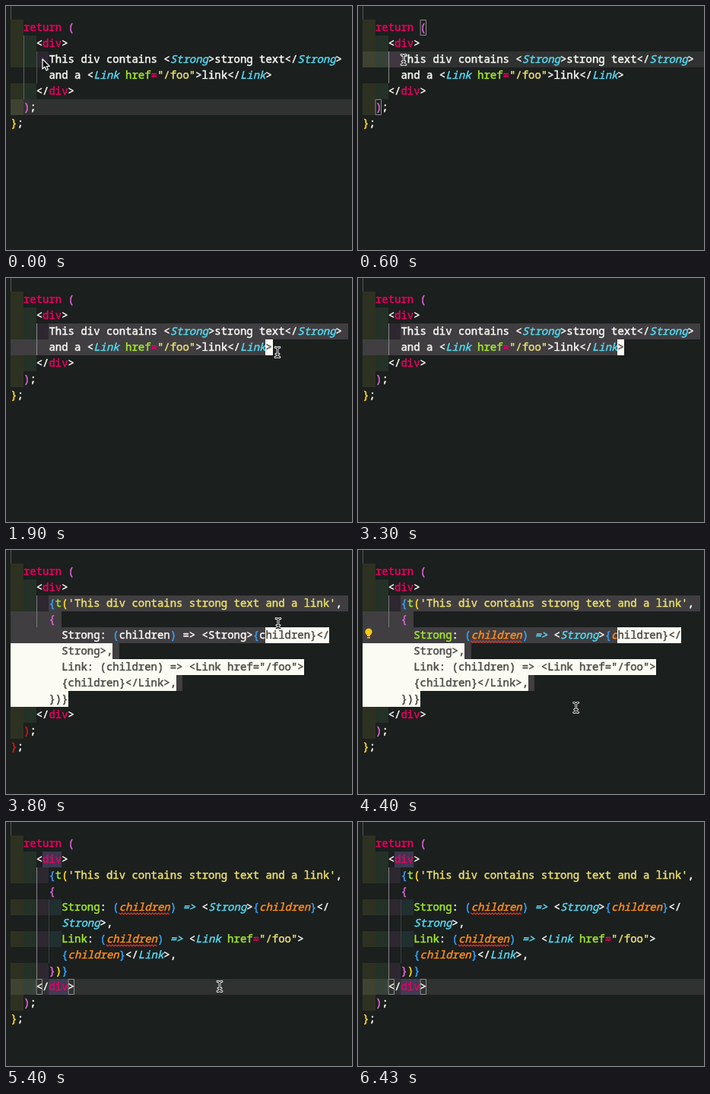
An HTML page with a canvas for the animation above (6.57 s loop, 455 px wide and 322 px high).

```html
<!DOCTYPE html>
<html lang="en">
<head>
<meta charset="utf-8">
<title>Editor refactoring</title>
<style>
html, body { margin: 0; width: 100%; height: 100%; overflow: hidden; background: #1b1f1e; }
canvas { display: block; width: 455px; height: 322px; }
</style>
</head>
<body>
<canvas id="stage" width="455" height="322"></canvas>
<script>
const ctx = document.getElementById('stage').getContext('2d');
const LOOP = 6570, STEP = 100, W = 455, H = 322;
const CW = 8.38, LH = 21, X0 = 6.2, Y0 = 18;
const FONT = '500 13.97px "Noto Sans Mono", "DejaVu Sans Mono", monospace';
const INK = { w: '#f8f8f4', p: '#e9005f', c: '#55d8ef', g: '#a0e52e', y: '#e9dd70',
  o: '#ff8c1a', b: '#35a0f5', m: '#da66cf', d: '#ffd71c', r: '#d01818' };
const BANDS = ['255,255,64', '127,255,127', '255,127,255', '79,236,236'];
const SELECTION = '#403e41', LIGHT = '#fbfbf3';

// Moments of the edit, in ms.
const CLICK = 600, DRAG = 1300, UNMATCH = 1700, PASTE = 3700, PARSED = 3900,
  BULB = 4100, LINT = 4300, RECLICK = 4500, WORDS = 4800, BULB_OFF = 5100;

const x = col => X0 + col * CW;
const y = row => Y0 + row * LH;

// Each line: indent, number of indent bands, then runs led by a colour key.
const head = [[2, 1, 'preturn|w |m('], [4, 2, 'w<|pdiv|w>']];
const tail = [[4, 2, 'w</|pdiv|w>'], [2, 1, 'm)|w;'], [0, 0, 'd}|w;']];
const link = 'w<|cLink|w |ghref|p=|y"/foo"|w>';
const before = [...head,
  [6, 3, 'wThis div contains <|cStrong|w>strong text</|cStrong|w>'],
  [6, 0, 'wand a ' + link.slice(1) + 'link</|cLink|w>'],
  ...tail];
const call = [
  [6, 3, "b{|gt|d(|y'This div contains strong text and a link'|w,"],
  [6, 0, 'm{']];
const after = [...head, ...call,
  [8, 4, 'gStrong|w: |b(|ochildren|b)|w |c=>|w <|cStrong|w>|b{|ochildren|b}|w</'],
  [8, 0, 'cStrong|w>,'],
  [8, 4, 'gLink|w: |b(|ochildren|b)|w |c=>|w |' + link],
  [8, 0, 'b{|ochildren|b}|w</|cLink|w>,'],
  [6, 3, 'm}|d)|b}'],
  ...tail];
const pasted = [...head, ...call,
  [8, 4, 'wStrong: |b(|wchildren|b)|w => <Strong>|b{|wchildren}</'],
  ...after.slice(5, 10),
  [2, 1, 'r)|w;'], [0, 0, 'r}|w;']];

function box(row, from, to, color) {
  ctx.fillStyle = color;
  ctx.fillRect(Math.round(x(from)), y(row), Math.round(x(to)) - Math.round(x(from)), LH);
}

function outline(row, col) {
  ctx.strokeStyle = '#8b8d8b';
  ctx.lineWidth = 1;
  ctx.strokeRect(Math.round(x(col)) + 0.5, y(row) + 0.5, 7, LH - 1);
}

function guide(col, from, to, color) {
  ctx.fillStyle = color;
  ctx.fillRect(Math.round(x(col)), y(from), 1, (to - from) * LH);
}

function lineHighlight(row) {
  ctx.fillStyle = '#303231';
  ctx.fillRect(6, y(row), W - 6, LH);
}

function bands(lines) {
  lines.forEach(([, count], row) => {
    for (let i = 0; i < count; i++) box(row, i * 2, i * 2 + 2, `rgba(${BANDS[i]},.08)`);
  });
}

// A hairline stroke gives the glyphs their semi-bold weight.
function text(lines, color) {
  ctx.textBaseline = 'alphabetic';
  ctx.lineJoin = 'round';
  ctx.lineWidth = 0.5;
  lines.forEach(([indent, , runs], row) => {
    let col = indent;
    for (const run of runs.split('|')) {
      const key = run[0], word = run.slice(1);
      const slanted = !color && (key === 'c' || key === 'o');
      ctx.font = (slanted ? 'italic ' : '') + FONT;
      ctx.fillStyle = ctx.strokeStyle = color || INK[key];
      ctx.fillText(word, x(col), y(row) + 15);
      ctx.strokeText(word, x(col), y(row) + 15);
      col += word.length;
    }
  });
}

// Light block with the text inside it drawn dark.
function inverse(lines, row, from, to) {
  ctx.save();
  ctx.beginPath();
  ctx.rect(Math.round(x(from)), y(row), Math.round(x(to)) - Math.round(x(from)), LH);
  ctx.clip();
  box(row, from, to, LIGHT);
  text(lines, '#4b4c46');
  ctx.restore();
}

function squiggle(row, col, len) {
  ctx.beginPath();
  const end = x(col + len);
  for (let px = x(col), i = 0; px <= end; px += 2, i++) ctx.lineTo(px, y(row) + 18 + (i % 2) * 2);
  ctx.strokeStyle = '#e5302b';
  ctx.lineWidth = 1.1;
  ctx.stroke();
}

function bulb() {
  ctx.fillStyle = '#ffc814';
  ctx.beginPath();
  ctx.arc(14, 108, 4.6, 0, Math.PI * 2);
  ctx.fill();
  ctx.fillRect(12, 110, 4, 4);
  ctx.fillRect(12, 115, 4, 1.5);
}

function arrow(px, py) {
  ctx.beginPath();
  [[0, 0], [0, 13], [3, 10.3], [5, 15], [7.3, 14], [5.3, 9.5], [9.3, 9.3]]
    .forEach(([dx, dy]) => ctx.lineTo(px + dx, py + dy));
  ctx.closePath();
  ctx.fillStyle = '#0a0a0a';
  ctx.fill();
  ctx.strokeStyle = '#fff';
  ctx.lineWidth = 1.2;
  ctx.stroke();
}

function ibeam(px, py) {
  ctx.beginPath();
  for (const s of [-1, 1]) {
    ctx.moveTo(px - 3, py + s * 6.5);
    ctx.quadraticCurveTo(px, py + s * 6.5, px, py + s * 4.5);
    ctx.quadraticCurveTo(px, py + s * 6.5, px + 3, py + s * 6.5);
  }
  ctx.moveTo(px, py - 5);
  ctx.lineTo(px, py + 5);
  ctx.moveTo(px - 2, py + 2.5);
  ctx.lineTo(px + 2, py + 2.5);
  ctx.lineCap = 'round';
  ctx.strokeStyle = '#fff';
  ctx.lineWidth = 2.8;
  ctx.stroke();
  ctx.strokeStyle = '#111';
  ctx.lineWidth = 1.1;
  ctx.stroke();
}

const PATH = [[300, 49, 72], [CLICK, 60, 71], [1200, 60, 71], [1800, 357, 98],
  [PARSED, 358, 97], [RECLICK, 281, 217]];

function pointerAt(t) {
  const i = PATH.findIndex(p => p[0] > t);
  if (i < 0) return PATH[PATH.length - 1].slice(1);
  if (i === 0) return PATH[0].slice(1);
  const [t0, ax, ay] = PATH[i - 1], [t1, bx, by] = PATH[i];
  const k = (t - t0) / (t1 - t0), e = k * k * (3 - 2 * k);
  return [ax + (bx - ax) * e, ay + (by - ay) * e];
}

function dragHead(t) {
  const [px, py] = pointerAt(t);
  return [py < y(3) ? 2 : 3, Math.max(6, Math.min(40, Math.floor((px - X0) / CW)))];
}

function drawBefore(t) {
  const selecting = t >= DRAG;
  const [row, col] = dragHead(t);
  if (!selecting) lineHighlight(t < CLICK ? 5 : 2);
  bands(before);
  if (selecting) {
    box(2, 6, row === 2 ? col : 53, SELECTION);
    if (row === 3) box(3, 0, col, SELECTION);
  }
  if (t < CLICK) guide(2, 1, 5, '#5d605d');
  guide(4, 2, 4, t < CLICK ? '#505350' : '#8a8c8a');
  if (t >= CLICK && t < UNMATCH) {
    outline(0, 9);
    outline(5, 2);
  }
  text(before);
  if (selecting) {
    inverse(before, row, col, col + 1);
    const barOn = t < 2400 || (t >= 2900 && t < 3300);
    if (barOn) {
      ctx.fillStyle = LIGHT;
      ctx.fillRect(Math.round(x(col + 1)), y(row), 1, LH);
    }
  }
}

function drawPasted(t) {
  const lines = t < PARSED ? pasted : after;
  bands(lines);
  box(2, 6, 53, SELECTION);
  box(3, 0, 8, SELECTION);
  box(4, 0, 40, SELECTION);
  box(5, 16, 17, SELECTION);
  box(7, 26, 27, SELECTION);
  guide(4, 2, 4, '#777a77');
  text(lines);
  if (t >= LINT) squiggles();
  inverse(lines, 4, 40, 50);
  [16, 46, 26, 9].forEach((end, i) => inverse(lines, 5 + i, 0, end));
}

function squiggles() {
  squiggle(4, 17, 8);
  squiggle(6, 15, 8);
}

function drawAfter(t) {
  lineHighlight(9);
  bands(after);
  guide(6, 4, 8, '#3b403e');
  guide(4, 2, 9, '#858885');
  if (t >= WORDS) {
    box(1, 5, 8, '#3b3851');
    box(9, 6, 9, '#3f3c55');
  }
  outline(9, 4);
  outline(9, 9);
  text(after);
  const blockOn = t < 5200 || (t >= 5700 && t < 6200);
  if (blockOn) inverse(after, 9, 9, 10);
  squiggles();
}

function draw(t) {
  ctx.fillStyle = '#1b1f1e';
  ctx.fillRect(0, 0, W, H);
  ctx.fillStyle = '#555855';
  ctx.fillRect(6, 0, 1, Y0);
  if (t < PASTE) drawBefore(t);
  else if (t < RECLICK) drawPasted(t);
  else drawAfter(t);
  if (t >= BULB && t < BULB_OFF) bulb();

  if (t < 300) arrow(48, 70);
  else if (t < 3100 || (t >= PASTE && t < 6200)) ibeam(...pointerAt(t));
}

function tick() {
  const t = performance.now() % LOOP;
  draw(Math.floor(t / STEP) * STEP);
  requestAnimationFrame(tick);
}
tick();
</script>
</body>
</html>
```
